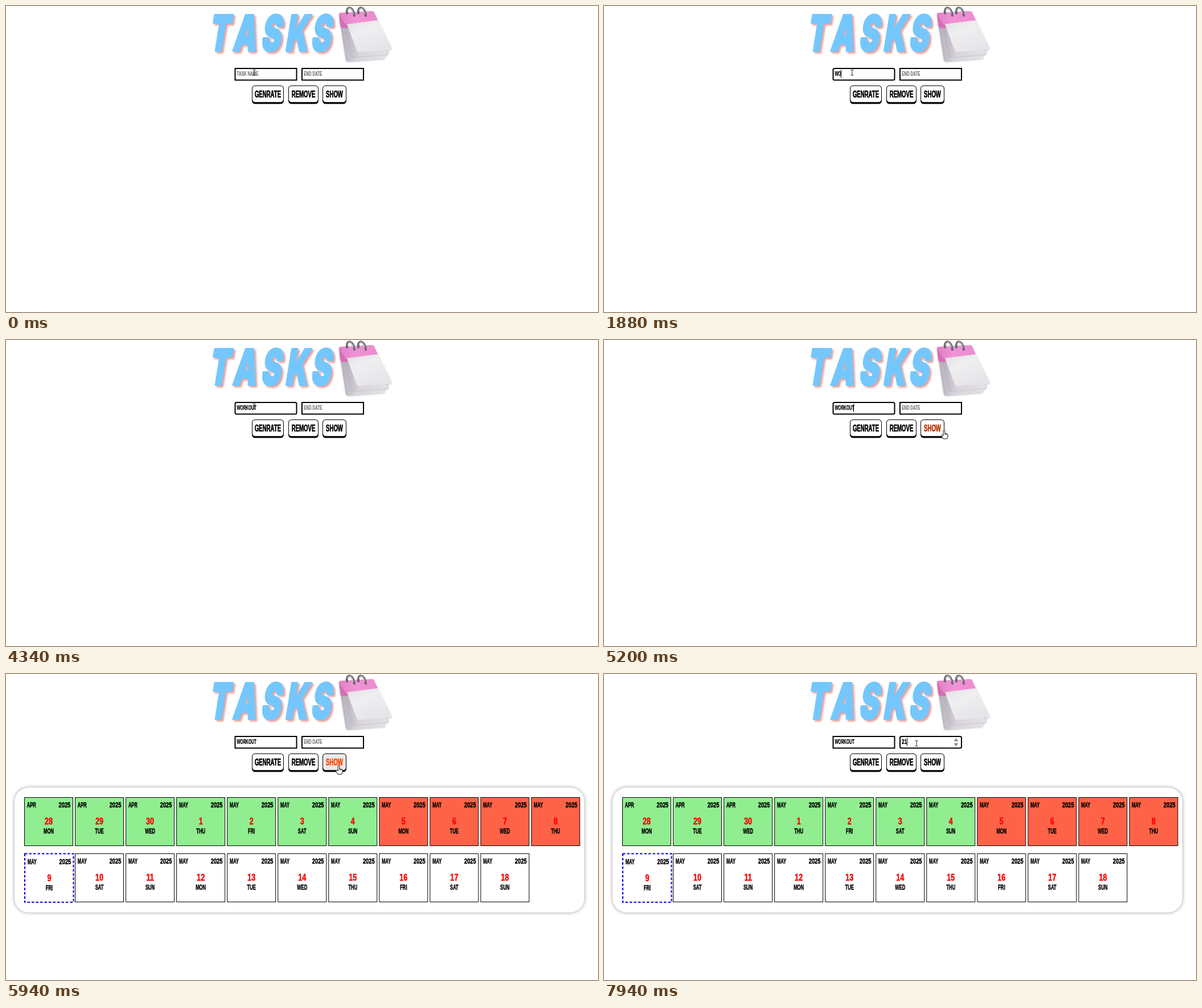
An HTML page that plays this animation: 1040x539 px, repeating every 8000 ms.

```html
<!DOCTYPE html>
<html lang="en">
<head>
<meta charset="utf-8">
<title>Tasks</title>
<style>
  html, body { margin: 0; width: 100%; height: 100%; overflow: hidden; background: #fff; }
  svg { display: block; width: 100vw; height: 100vh; }
  text { font-family: "Liberation Sans", Arial, sans-serif; font-weight: 700; }
  .title { filter: drop-shadow(3px 3px 1.5px rgba(226, 130, 122, .75)); }
  .title text { font: 900 87px Inter, sans-serif; fill: #74c7fd; stroke: #74c7fd; stroke-width: 3.5; stroke-linejoin: round; text-anchor: middle; }
  .icon { filter: drop-shadow(0 1px 1.5px rgba(90, 80, 100, .35)); }
  .panel { filter: drop-shadow(0 0 3px rgba(0, 0, 0, .4)); }
  .field { fill: #fff; stroke: #000; stroke-width: 2; }
  .caret { stroke: #000; stroke-width: 1; }
</style>
</head>
<body>
<svg id="stage" viewBox="0 0 1040 539" xmlns="http://www.w3.org/2000/svg">
  <defs>
    <linearGradient id="paper" x1="0" y1="0" x2=".6" y2="1">
      <stop offset="0" stop-color="#e2e0e4"/><stop offset=".4" stop-color="#efeef0"/><stop offset="1" stop-color="#e6e4e8"/>
    </linearGradient>
    <linearGradient id="under" x1="0" y1="0" x2="1" y2="0">
      <stop offset="0" stop-color="#b3adb8"/><stop offset=".35" stop-color="#d8d5db"/><stop offset="1" stop-color="#e4e2e6"/>
    </linearGradient>
    <linearGradient id="pink" x1="0" y1="0" x2="1" y2="0">
      <stop offset="0" stop-color="#e27fc4"/><stop offset=".4" stop-color="#f093d6"/><stop offset="1" stop-color="#ec8bd0"/>
    </linearGradient>
  </defs>

  <g class="title">
    <g transform="translate(373 78.5) skewX(-9) scale(.6 1)"><text x="0 75 152 227 298">TASKS</text></g>
  </g>

  <g class="icon">
    <path fill="url(#under)" d="M588 36L602 30L666 87Q668 92 663 93L602 98Q598 98 597 95Z"/>
    <path fill="url(#under)" stroke="#bbb6bf" stroke-width=".6" d="M594 37L604 30L671 80Q673 85 668 86L609 91Q606 91 605 88Z"/>
    <path fill="#d46fb4" d="M585 15L600 18L606 38L590 39Q588 38 587 34Z"/>
    <path fill="url(#pink)" d="M585 15Q585 12 588 12L643 9Q646 9 647 12L654 27L604 34L597 33Z"/>
    <path fill="url(#paper)" d="M599 32L653 25L677 73Q678 77 674 77L621 81Q617 81 616 78Z"/>
  </g>
  <g fill="none" stroke-linecap="round">
    <path id="ring" stroke="#6c6870" stroke-width="4" d="M599 13C597 0 610 -1 612 17"/>
    <path stroke="#c9c6cd" stroke-width="1.4" d="M600 8C602 2 608 3 610 13"/>
    <use href="#ring" x="20" y="0"/>
    <path stroke="#c9c6cd" stroke-width="1.4" d="M620 8C622 2 628 3 630 13"/>
  </g>

  <g id="page"></g>
  <g id="panel"></g>

  <g id="beam" fill="none" stroke="#222" stroke-width="1">
    <path d="M-2.5 -4.5H-.8L0 -4L.8 -4.5H2.5M0 -4V4.5M-2.5 5H-.8L0 4.5L.8 5H2.5"/>
  </g>
  <g id="hand" fill="#fff" stroke="#111" stroke-width="1" stroke-linejoin="round">
    <path d="M-1.4 10V1.4a1.4 1.4 0 0 1 2.8 0V6L5.2 6.8Q6.7 7.2 6.7 8.8V11.5L5.2 15.5H-1.5L-4.6 10.4Q-5 8 -3 8.4Z"/>
    <path fill="none" stroke-width=".7" d="M1.4 6V9M3.2 6.5V9M5 7V9"/>
  </g>
</svg>

<script>
const LOOP = 8000;
const NARROW = 0.56, DIGIT = 0.69, BUTTON = 0.6, DAY = 0.79;
const $ = id => document.getElementById(id);

function add(parent, tag, attrs) {
  const el = document.createElementNS("http://www.w3.org/2000/svg", tag);
  for (const key in attrs) el.setAttribute(key, attrs[key]);
  return parent.appendChild(el);
}

// Condensed lettering: one horizontal scale per type style
function label(parent, x, y, content, size, scale, fill = "#000", anchor = "middle", weight = 0.5) {
  const el = add(parent, "text", {
    transform: `translate(${x} ${y}) scale(${scale} 1)`,
    "font-size": size, "text-anchor": anchor, fill, stroke: fill, "stroke-width": weight
  });
  el.textContent = content;
  return el;
}

const show = (el, on) => { el.style.display = on ? "" : "none"; };
const ramp = (t, from, to) => Math.min(1, Math.max(0, (t - from) / (to - from)));
const lastStep = (steps, t) => steps.filter(s => s[0] <= t).pop();
const grey = v => `rgb(${v},${v},${v})`;

function makeField(x, placeholder, scale) {
  const g = $("page");
  return {
    x: x + 4,
    box: add(g, "rect", { class: "field", x: x + 1, y: 110, width: 108, height: 20.5 }),
    hint: label(g, x + 4, 123, placeholder, 11.6, NARROW, "#757078", "start", 0.2),
    value: label(g, x + 4, 123, "", 11.6, scale, "#000", "start", 0.3),
    caret: add(g, "path", { class: "caret", d: "M0 112.5V126.5" })
  };
}

function updateField(field, text, focused, caretX, caretOn) {
  field.box.setAttribute("rx", focused ? 2.5 : 0);
  if (field.value.textContent !== text) field.value.textContent = text;
  show(field.hint, !text);
  show(field.caret, focused && caretOn);
  field.caret.setAttribute("transform", `translate(${caretX} 0)`);
}

function makeButton(x, width, content) {
  const g = $("page");
  const base = add(g, "rect", { x, y: 140, width, height: 32.5, rx: 5.5 });
  const face = add(g, "rect", { x: x + 1, y: 141, width: width - 2, height: 28.3, rx: 4.5, fill: "#fff" });
  return { base, face, text: label(g, x + width / 2, 160.8, content, 16, BUTTON, "#000", "middle", 0.7) };
}

const task = makeField(401.5, "TASK NAME", NARROW);
const end = makeField(519, "END DATE", DIGIT);
const spinner = add($("page"), "path", {
  d: "M614.5 118.5L618.5 113L622.5 118.5ZM614.5 122L618.5 127.5L622.5 122Z", fill: "#8b8b8b"
});
makeButton(432, 56, "GENRATE");
makeButton(496, 53, "REMOVE");
const showButton = makeButton(556, 42, "SHOW");

function buildPanel() {
  const g = $("panel");
  const weekdays = ["SUN", "MON", "TUE", "WED", "THU", "FRI", "SAT"];
  const today = 11, columns = 11, count = 21;
  add(g, "rect", { class: "panel", x: 15, y: 200, width: 1001, height: 220, rx: 25, fill: "#fff" });
  for (let i = 0; i < count; i++) {
    const date = new Date(2025, 3, 28 + i);
    const isToday = i === today;
    const shift = isToday ? 1 : 0;
    const x = 32 + (i % columns) * 89.05;
    const y = 217 + Math.floor(i / columns) * 99;
    const fill = i < 7 ? "#90ee90" : i < today ? "#ff6347" : "#fff";
    const size = isToday ? 85.5 : 85;
    add(g, "rect", {
      x: x + 0.5 + shift / 2, y: y + 0.5, width: size, height: size, fill,
      stroke: isToday ? "#0000e6" : "#000", "stroke-width": 1 + shift,
      "stroke-dasharray": isToday ? "4.5 3" : "none"
    });
    const at = (dx, dy, ...rest) => label(g, x + dx + shift, y + dy + shift, ...rest);
    at(4.8, 17.5, date.getMonth() === 3 ? "APR" : "MAY", 13.5, NARROW, "#000", "start");
    at(81.3, 17.5, "2025", 13.5, DIGIT, "#000", "end");
    at(43, 47.8, date.getDate(), 16, DAY, "#f00");
    at(43, 64, weekdays[date.getDay()], 13.5, NARROW + 0.01);
  }
}
buildPanel();

// time, letters typed, caret x
const taskTyping = [
  [0, 0, 405.5], [1570, 1, 411.5], [1880, 2, 416.5], [2010, 3, 421],
  [2160, 4, 425.5], [2360, 5, 430.5], [2620, 6, 435], [2750, 7, 438.5]
];
const endTyping = [[0, 0, 523.5], [7410, 1, 527.7], [7610, 2, 532.5]];

// time, x, y, pointer shape
const pointer = [
  [0, 436, 117, "beam"], [4870, 441, 117, "beam"], [4940, 476, 118, "beam"],
  [5000, 560, 120, "beam"], [5070, 601, 126, "beam"], [5140, 596, 148, "hand"],
  [5200, 597.5, 158.5, "hand"], [5270, 590, 160, "hand"], [5340, 584.5, 161, "hand"],
  [6540, 583, 155, "hand"], [6610, 577, 146, "hand"], [6670, 568, 127, "beam"],
  [6740, 560, 124, "beam"], [6870, 552, 122, "beam"], [7010, 549, 122, "beam"]
];

function render(t) {
  const taskFocus = t >= 270 && t < 5730;
  const endFocus = t >= 7220;
  const [typedAt, letters, caretX] = lastStep(taskTyping, t);
  const blinkOn = Math.floor((t - (typedAt || 280)) / 530) % 2 === 0;
  updateField(task, "WORKOUT".slice(0, letters), taskFocus, caretX, blinkOn);
  const [, digits, endCaret] = lastStep(endTyping, t);
  updateField(end, "21".slice(0, digits), endFocus, endCaret, true);
  show(spinner, (t >= 5000 && t < 5140) || t >= 6670);

  const hover = ramp(t, 5080, 5250) - ramp(t, 6620, 6770);
  const press = ramp(t, 5730, 5830) - ramp(t, 5910, 6140);
  const ink = `rgb(${255 * hover},${69 * hover},0)`;
  showButton.text.setAttribute("fill", ink);
  showButton.text.setAttribute("stroke", ink);
  showButton.face.setAttribute("fill", grey(255 - 26 * press));
  showButton.base.setAttribute("fill", grey(t >= 5730 && t < 5910 ? 50 * press : 0));

  show($("panel"), t >= 5930);

  const [, x, y, shape] = lastStep(pointer, t);
  for (const name of ["beam", "hand"]) show($(name), name === shape);
  $(shape).setAttribute("transform", `translate(${x} ${y})`);
}

const start = performance.now();
function tick() {
  render((performance.now() - start) % LOOP);
  requestAnimationFrame(tick);
}
tick();
</script>
</body>
</html>
```
